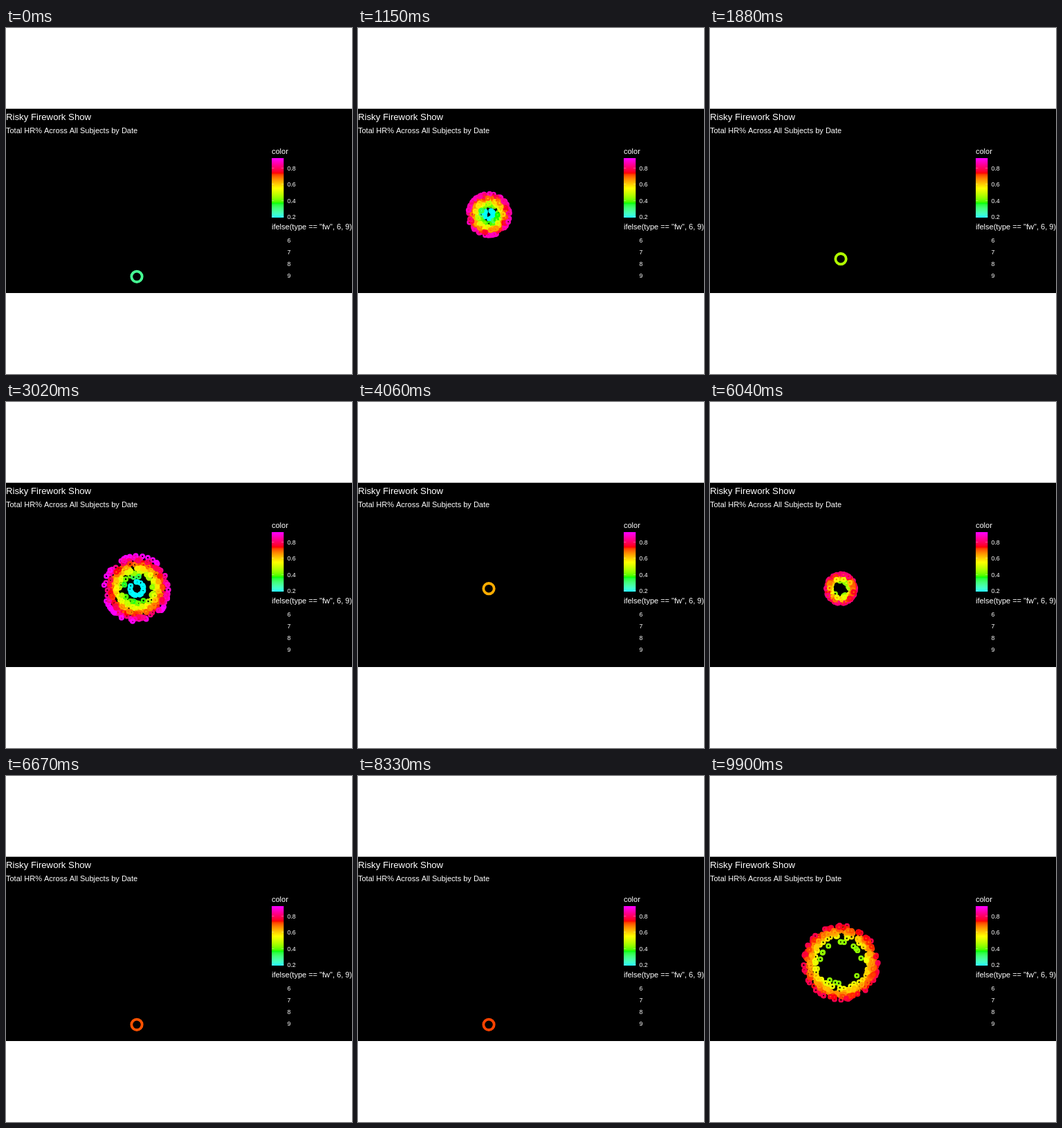
These frames come from a looping animation (500 by 500 pixels, 10000 ms). An HTML page with a canvas:

```html
<!DOCTYPE html>
<html lang="en">
<head>
<meta charset="utf-8">
<title>Risky Firework Show</title>
<style>
  html, body { margin: 0; height: 100%; overflow: hidden; background: #fff; }
  canvas { display: block; }
</style>
</head>
<body>
<canvas width="500" height="500"></canvas>
<script>
const ctx = document.querySelector('canvas').getContext('2d');
const LOOP = 10000, STEPS = 96, SHOT_STEPS = 16, RISE_STEPS = 7;
const CX = 189, GROUND = 359.3, RISE_SPEED = 12.8, BURST_SPEED = 8.5;
const PEAK = GROUND - RISE_STEPS * RISE_SPEED;
const SPARKS = 400, SLOW_SHARE = 0.04;

// Colour scale: evenly spaced RGB stops, blended in CIE Lab
const LOW = 0.19, HIGH = 0.928;
const STOPS = [[0, 1, 1], [0, 1, 0], [1, 1, 0], [1, 0, 0], [1, 0, 1]];
const RGB_TO_XYZ = [[0.4339, 0.3762, 0.1899], [0.2126, 0.7152, 0.0722], [0.0177, 0.1095, 0.8728]];
const XYZ_TO_RGB = [[3.08, -1.5372, -0.5429], [-0.9209, 1.8758, 0.0452], [0.0529, -0.204, 1.1509]];

const clamp = (x, min, max) => Math.max(min, Math.min(max, x));
const lerp = (a, b, t) => a + (b - a) * t;
const multiply = (matrix, v) => matrix.map(row => row.reduce((sum, m, i) => sum + m * v[i], 0));
const labCurve = x => x > 0.008856 ? Math.cbrt(x) : 7.787 * x + 0.1379;
const labInverse = x => x > 0.2069 ? x ** 3 : (x - 0.1379) / 7.787;
const gamma = x => x > 0.0031308 ? 1.055 * x ** (1 / 2.4) - 0.055 : 12.92 * x;
const labStops = STOPS.map(rgb => multiply(RGB_TO_XYZ, rgb).map(labCurve));

function colorAt(value) {
  const pos = clamp((value - LOW) / (HIGH - LOW), 0, 1) * (STOPS.length - 1);
  const i = Math.min(STOPS.length - 2, Math.floor(pos));
  const xyz = labStops[i].map((c, k) => labInverse(lerp(c, labStops[i + 1][k], pos - i)));
  const rgb = multiply(XYZ_TO_RGB, xyz).map(c => Math.round(255 * gamma(clamp(c, 0, 1))));
  return `rgb(${rgb})`;
}

let seed = 7;
function random() {
  seed = (seed * 16807) % 2147483647;
  return seed / 2147483647;
}
const gauss = () => (random() + random() + random() + random() - 2) * Math.sqrt(3);

// A spark's value sets both its speed and its colour
function makeSpark(low, high) {
  const value = random() < SLOW_SHARE
    ? low
    : clamp(lerp(low, high, 0.69 + 0.2 * gauss()), low, high);
  const angle = random() * 2 * Math.PI;
  return { dx: Math.cos(angle) * value, dy: Math.sin(angle) * value, color: colorAt(value) };
}

function makeShot(rocket, low, high) {
  return {
    color: colorAt(rocket),
    sparks: Array.from({ length: SPARKS }, () => makeSpark(low, high))
  };
}

const shots = [
  makeShot(0.29, 0.19, 0.88),
  makeShot(0.47, 0.19, 0.93),
  makeShot(0.64, 0.3, 0.8),
  makeShot(0.702, 0.44, 0.83),
  makeShot(0.715, 0.44, 0.8),
  makeShot(0.724, 0.44, 0.79)
];

function ring(x, y, radius, width, color) {
  ctx.beginPath();
  ctx.arc(x, y, radius, 0, 2 * Math.PI);
  ctx.lineWidth = width;
  ctx.strokeStyle = color;
  ctx.stroke();
}

function text(str, x, y, size) {
  ctx.font = `${size}px "Liberation Sans", Arial, sans-serif`;
  ctx.fillStyle = '#fff';
  ctx.fillText(str, x, y);
}

function drawChart() {
  ctx.fillStyle = '#fff';
  ctx.fillRect(0, 0, 500, 500);
  ctx.fillStyle = '#000';
  ctx.fillRect(0, 116.7, 500, 266.3);

  text('Risky Firework Show', 0, 133, 13.2);
  text('Total HR% Across All Subjects by Date', 0, 152, 11);

  text('color', 384, 182, 11);
  for (let y = 188; y < 274; y++) {
    ctx.fillStyle = colorAt(0.2 + (273 - y) / 117);
    ctx.fillRect(384, y, 17.3, 1);
  }
  for (let i = 0; i < 4; i++) {
    const y = Math.round(203 + i * 23.4);
    ctx.fillStyle = 'rgba(255,255,255,0.3)';
    ctx.fillRect(384, y - 1, 3.4, 1);
    ctx.fillRect(397.9, y - 1, 3.4, 1);
    text((0.8 - i * 0.2).toFixed(1), 406.5, y + 3, 8.8);
  }

  text('ifelse(type == "fw", 6, 9)', 384, 291, 11);
  for (let i = 0; i < 4; i++) text(String(6 + i), 406.5, 310 + i * 17, 8.8);
}

function draw() {
  // Steps start on whole hundredths of a second, hence the half-unit shift
  const step = Math.floor((performance.now() + 5) % LOOP / LOOP * STEPS);
  const shot = shots[Math.floor(step / SHOT_STEPS)];
  const phase = step % SHOT_STEPS;
  drawChart();
  if (phase <= RISE_STEPS) {
    ring(CX, GROUND - phase * RISE_SPEED, 7.7, 3.8, shot.color);
  } else {
    const spread = (phase - RISE_STEPS) * BURST_SPEED;
    for (const { dx, dy, color } of shot.sparks) {
      ring(CX + dx * spread, PEAK + dy * spread, 2.6, 2.7, color);
    }
  }
  requestAnimationFrame(draw);
}
draw();
</script>
</body>
</html>
```
